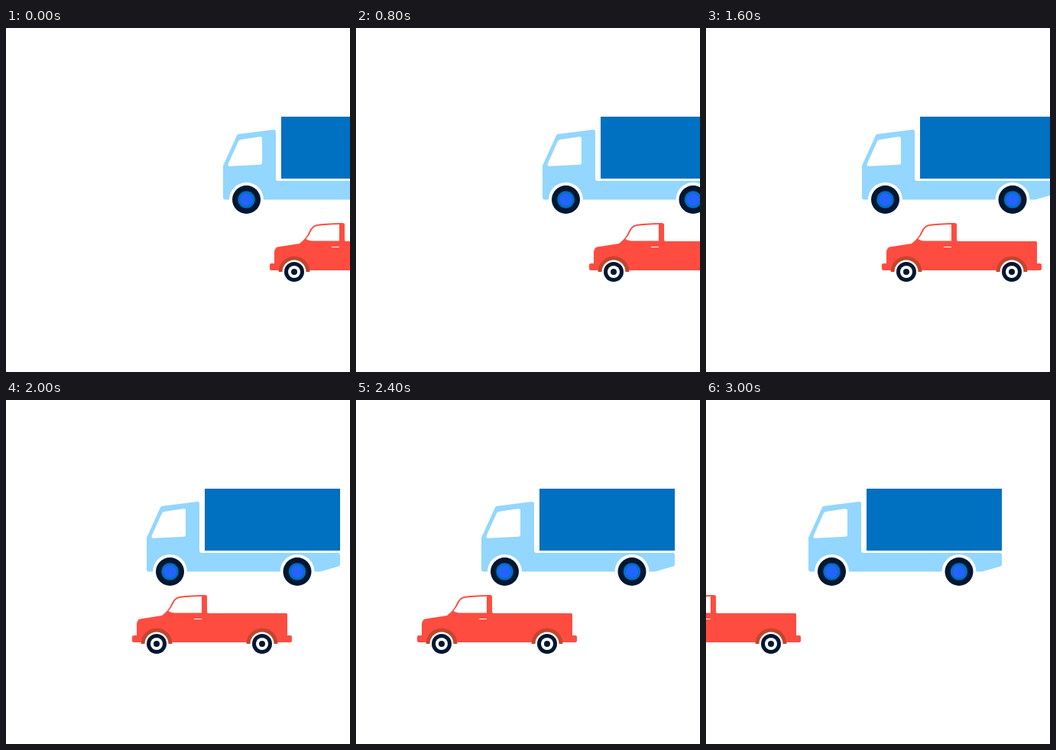
An HTML page that plays this animation: 450x450 px, repeating every 3200 ms.

```html
<!DOCTYPE html>
<html lang="en">
<head>
<meta charset="utf-8">
<title>Truck and pickup</title>
<style>
  html, body { margin: 0; width: 100%; height: 100%; overflow: hidden; background: #fff; }
  svg { display: block; width: 100vw; height: 100vh; }
</style>
</head>
<body>
<svg viewBox="0 0 450 450">
  <defs>
    <g id="truckWheel">
      <circle r="22.5" fill="#fff"/>
      <circle r="18.5" fill="#001732"/>
      <circle r="11.2" fill="#0070c0"/>
      <circle r="8.3" fill="#2463ff"/>
    </g>
    <g id="carWheel">
      <path d="M-20.5 0a20.5 20.5 0 0 1 41 0z" fill="#c1462f"/>
      <circle r="15.5" fill="#fff"/>
      <circle r="13" fill="#001732"/>
      <circle r="8" fill="#fff"/>
      <circle r="4" fill="#001732"/>
    </g>
  </defs>
  <g id="truck">
    <path fill="#93d6ff" d="M0 180L18 140.500Q18.700 139 20.500 138.800L66 133Q69 132.700 69 135.500V197Q69 200 72 200H250Q253 200 253 203V215.500Q253 217 251.500 217.500L227 224.500H3Q0 224.500 0 221.500Z"/>
    <path fill="#fff" d="M20 148Q21 146.300 23 146L48 142.200Q51 141.800 51 144.500V176Q51 178.700 48.500 178.800L9 180.800Q5.500 181 7 177Z"/>
    <path fill="#0070c0" d="M76 116H253V197H76Z"/>
    <use href="#truckWheel" x="30.500" y="224.500"/>
    <use href="#truckWheel" x="197" y="224.500"/>
  </g>
  <g id="car">
    <path fill="#ff4c41" d="M0 310Q0 308 2 308H6V293Q6 291 7 289.500Q8 287 10 286.600L39 282Q48 275 51.500 266.500Q55 258.500 61 257.300Q72 255.200 95 255Q98 255 98 257.500V277Q98 279 100 279H201.500Q203 279 203 280.500V308H207Q209 308 209 310V315Q209 317 207 317H2Q0 317 0 315Z"/>
    <path fill="#fff" d="M47.500 276Q52 271 54.500 265Q57 260 62 259Q73 257.300 91 257V278.500H55Q50.500 278.300 47.500 276Z"/>
    <path fill="#fff" d="M81 286H91V287H81Z"/>
    <use href="#carWheel" x="32" y="319"/>
    <use href="#carWheel" x="170" y="319"/>
  </g>
</svg>
<script>
  const STEP = 200, STEPS = 16;
  const truck = document.getElementById('truck');
  const car = document.getElementById('car');

  // The pickup cruises beside the truck, then speeds up by 5px every step.
  const carShift = n => Array.from({ length: n }, (_, i) =>
    i < 4 ? 10 : Math.max(15, 5 * i - 10)).reduce((a, b) => a + b, 0);

  const place = (el, x) => el.setAttribute('transform', `translate(${x})`);

  function draw() {
    const n = Math.floor(performance.now() / STEP) % STEPS;
    place(truck, 284 - 10 * n);
    place(car, 345 - carShift(n));
    requestAnimationFrame(draw);
  }
  draw();
</script>
</body>
</html>
```
